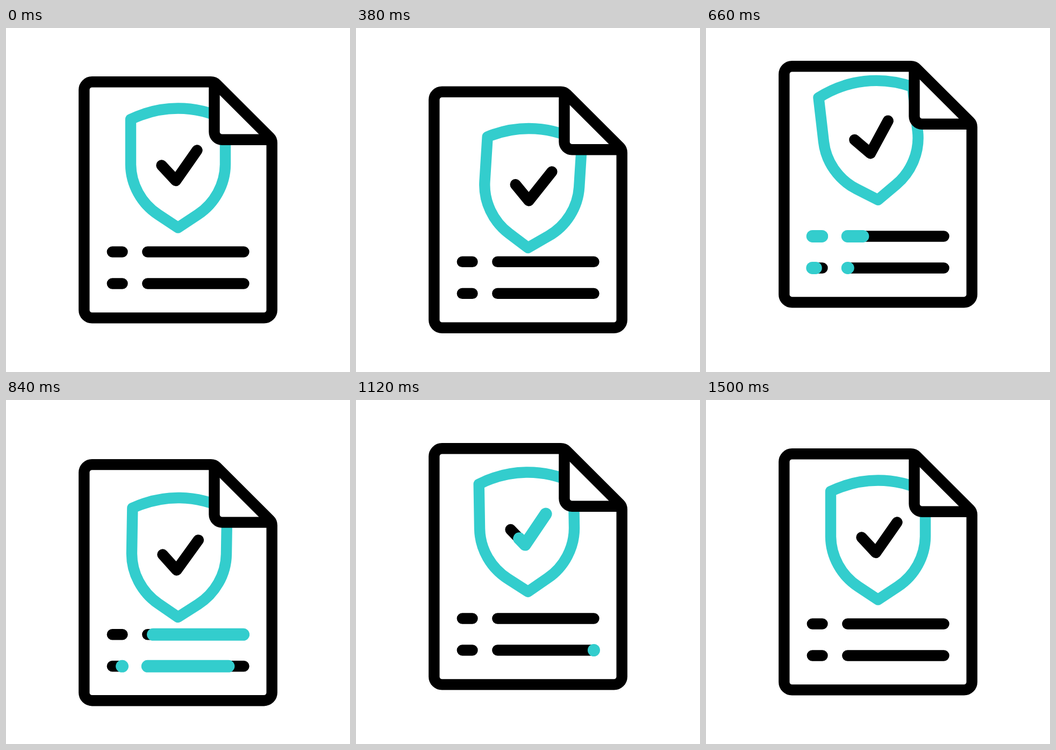
Recreate the animation shown at these times as an HTML page. Size 640 px wide and 640 px high, loop 1560 ms.

```html
<!DOCTYPE html>
<html lang="en">
<head>
<meta charset="utf-8">
<title>Protected document</title>
<style>
  html, body { margin: 0; width: 100%; height: 100%; overflow: hidden; background: #fff; }
  svg { display: block; width: 100%; height: 100%; }
  path { fill: none; stroke: #000; stroke-width: 20.4; stroke-linecap: round; stroke-linejoin: round; }
  .teal { stroke: #33cdcd; }
  .run { stroke: #33cdcd; stroke-width: 23; }
  .flap { fill: #fff; stroke: none; }
</style>
</head>
<body>
<svg viewBox="0 0 640 640">
  <g id="doc">
    <g id="shield">
      <path class="teal" d="M320 149.5C290 149.5 260 156.5 232 170V253C232 291 252 326.5 283 347L320 371.5L357 347C388 326.5 408 291 408 253V170C380 156.5 350 149.5 320 149.5Z"/>
      <path d="M289.5 255.5L316 284L355.5 227.5"/>
      <path class="run" id="check" pathLength="100" d="M289.5 255.5L316 284L355.5 227.5"/>
    </g>
    <path class="flap" d="M387.5 100L495 207.8H387.5Z"/>
    <path d="M387.5 102V193.3a14.5 14.5 0 0 0 14.5 14.5H493"/>
    <path d="M160 100.3H381C385 100.3 388.7 101.6 391.5 104.4L490.7 203.4C493.5 206.2 494.7 209.6 494.7 213.5V524.7a14.7 14.7 0 0 1 -14.7 14.7H160a14.7 14.7 0 0 1 -14.7 -14.7V115a14.7 14.7 0 0 1 14.7 -14.7Z"/>
    <path d="M197.8 416.5H216.5M263.3 416.5H442.5M197.8 475.5H216.5M263.3 475.5H442.5"/>
    <path class="run" id="dashA" pathLength="100" d="M197.8 416.5H216.5"/>
    <path class="run" id="lineA" pathLength="100" d="M263.3 416.5H442.5"/>
    <path class="run" id="dashB" pathLength="100" d="M197.8 475.5H216.5"/>
    <path class="run" id="lineB" pathLength="100" d="M263.3 475.5H442.5"/>
  </g>
</svg>
<script>
  const LOOP = 1560, STEP = 20;
  const $ = id => document.getElementById(id);

  // [time, value] keys joined by sine ease-in-out
  const docY = [[200, 0], [420, 20], [590, -39], [850, 20], [1120, -10], [1400, 0]];
  const shieldY = [[200, 0], [410, 20], [620, -25], [880, 15], [1170, -6.5], [1480, 0]];
  const shieldTurn = [[210, 0], [420, 3.9], [640, -6.7], [940, 3.5], [1220, -2.7], [1500, 0]];

  // highlight runs: head start, tail start, duration
  const runs = {
    dashA: [522, 645, 160],
    dashB: [596, 702, 160],
    lineA: [592, 800, 260],
    lineB: [648, 862, 260],
    check: [860, 1040, 260]
  };

  const ease = p => (1 - Math.cos(Math.PI * Math.min(1, Math.max(0, p)))) / 2;

  function valueAt(keys, t) {
    let v = keys[0][1];
    for (let i = 1; i < keys.length; i++) {
      const [t0, v0] = keys[i - 1], [t1, v1] = keys[i];
      if (t > t0) v = v0 + (v1 - v0) * ease((t - t0) / (t1 - t0));
    }
    return v;
  }

  function drawRun(id, t) {
    const [headStart, tailStart, span] = runs[id];
    const head = 100 * ease((t - headStart) / span);
    const tail = 100 * ease((t - tailStart) / span);
    const el = $(id);
    el.style.visibility = head > tail ? "visible" : "hidden";
    el.setAttribute("stroke-dasharray", `${Math.max(head - tail, 0.01)} 300`);
    el.setAttribute("stroke-dashoffset", -tail);
  }

  function draw(t) {
    $("doc").setAttribute("transform", `translate(0 ${valueAt(docY, t)})`);
    $("shield").setAttribute("transform",
      `translate(0 ${valueAt(shieldY, t)}) rotate(${valueAt(shieldTurn, t)} 320 371.5)`);
    for (const id in runs) drawRun(id, t);
  }

  const start = performance.now();
  function tick() {
    const t = (performance.now() - start) % LOOP;
    draw(Math.floor((t + 3) / STEP) * STEP);
    requestAnimationFrame(tick);
  }
  tick();
</script>
</body>
</html>
```
